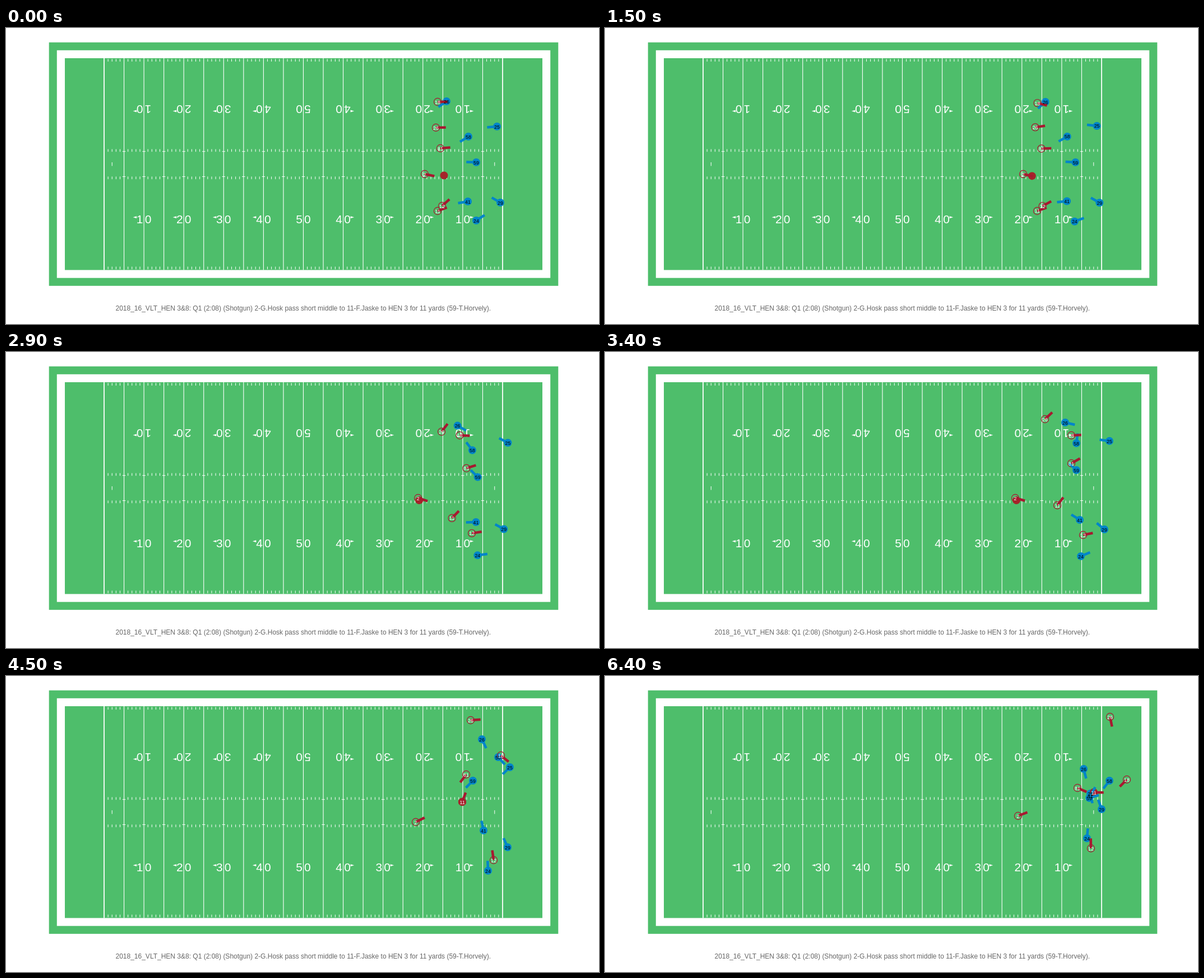
Recreate the animation shown at these times as an HTML page with a canvas. Size 1058 px wide and 529 px high, loop 6500 ms.

```html
<!DOCTYPE html>
<html lang="en">
<head>
<meta charset="utf-8">
<title>Play animation</title>
<style>
  html, body { margin: 0; width: 100%; height: 100%; overflow: hidden; background: #fff; }
  canvas { display: block; }
</style>
</head>
<body>
<canvas id="stage" width="1058" height="529"></canvas>
<script>
const ctx = document.getElementById('stage').getContext('2d');
const GREEN = '#4ebe6b', RED = '#a71930', BLUE = '#0085ca', BALL = '#a5242a';
const LOOP = 6500, STEP = 100;
const GOAL = 175, YARD = 7.11, LEFT = 105, RIGHT = 957, TOP = 54, BOTTOM = 432.5;
const SPOT = [781.5, 263.5], SNAP = [1000, 1850], PASS = [3600, 4300];
const WAYPOINT_TIMES = [1200, 2300, 3400, 4500, 6400];
const players = [];

// Stance is the facing before the pass, in degrees; the route is a few waypoints.
function addPlayer(color, number, stance, route) {
  const player = { color, number, stance: stance * Math.PI / 180, route };
  players.push(player);
  return player;
}
const defense = (number, stance, ...route) => addPlayer(BLUE, number, stance, route);
const offense = (number, stance, ...route) => addPlayer(RED, number, stance, route);

defense(26, 145, [786, 131], [790, 136], [821, 126], [849, 113], [854, 166]);
defense(25, 175, [876, 176], [888, 168], [900, 159], [899, 163], [866, 210]);
defense(58, 148, [825, 194], [826, 189], [841, 163], [878, 145], [900, 187]);
defense(59, 182, [839, 240], [841, 236], [841, 211], [833, 187], [864, 218]);
defense(41, 170, [824, 310], [828, 306], [847, 300], [852, 276], [866, 214]);
defense(29, 210, [882, 312], [885, 314], [891, 317], [895, 306], [886, 238]);
defense(24, -33, [839, 344], [834, 357], [849, 365], [860, 348], [860, 290]);
offense(18, -1, [770, 132], [787, 146], [832, 149], [883, 142], [931, 185]);
offense(26, -1, [767, 178], [773, 166], [785, 120], [829, 79], [901, 73]);
offense(81, -5, [775, 215], [803, 215], [832, 199], [821, 176], [843, 200]);
offense(12, -42, [778, 318], [803, 320], [853, 327], [870, 329], [867, 308]);
const passer = offense(2, 12, [747, 261], [740, 261], [732, 261], [731, 261], [737, 250]);
const receiver = offense(11, -20, [770, 327], [781, 319], [807, 274], [814, 225], [872, 208]);

const clamp = (v, low, high) => Math.max(low, Math.min(high, v));
const progress = (t, [start, end]) => clamp((t - start) / (end - start), 0, 1);
const mix = (a, b, u) => a.map((v, axis) => v + (b[axis] - v) * u);

// Smooth curve through the waypoints, at rest at both ends.
function position({ route }, time) {
  const times = WAYPOINT_TIMES, last = times.length - 1;
  const t = clamp(time, times[0], times[last]);
  let i = 0;
  while (i < last - 1 && t >= times[i + 1]) i++;
  const span = times[i + 1] - times[i], u = (t - times[i]) / span;
  return route[i].map((from, axis) => {
    const slope = k => (route[k + 1][axis] - route[k][axis]) / (times[k + 1] - times[k]);
    const tangent = k => {
      if (k === 0 || k === last) return 0;
      const before = times[k] - times[k - 1], after = times[k + 1] - times[k];
      return (slope(k - 1) * after + slope(k) * before) / (before + after);
    };
    return from + slope(i) * span * u * u * (3 - 2 * u)
      + span * u * (1 - u) * (tangent(i) * (1 - u) - tangent(i + 1) * u);
  });
}

function ballPosition(t) {
  const [x, y] = position(passer, t);
  const held = mix(SPOT, [x + 2, y + 4], progress(t, SNAP));
  return mix(held, position(receiver, t), progress(t, PASS));
}

// Players keep their stance, then watch the ball, and lean into their run.
function facing(player, t, ball) {
  const [x, y] = position(player, t);
  const [dx, dy] = [ball[0] - x, ball[1] - y];
  const distance = Math.max(20, Math.hypot(dx, dy));
  const look = mix([Math.cos(player.stance), Math.sin(player.stance)],
    [dx / distance, dy / distance], progress(t, PASS));
  const earlier = position(player, t - 500), later = position(player, t + 300);
  return Math.atan2(look[1] + (later[1] - earlier[1]) / 20,
    look[0] + (later[0] - earlier[0]) / 20);
}

function line(x1, y1, x2, y2, width, color = '#fff') {
  ctx.strokeStyle = color;
  ctx.lineWidth = width;
  ctx.beginPath();
  ctx.moveTo(x1, y1);
  ctx.lineTo(x2, y2);
  ctx.stroke();
}

function text(string, x, y, size, color) {
  ctx.font = `${size}px "Liberation Sans", Arial, sans-serif`;
  ctx.textAlign = 'center';
  ctx.fillStyle = color;
  ctx.fillText(string, x, y);
}

function circle(x, y, radius) {
  ctx.beginPath();
  ctx.arc(x, y, radius, 0, Math.PI * 2);
}

function disc(x, y, color) {
  circle(x, y, 7);
  ctx.fillStyle = color;
  ctx.fill();
}

function fieldRect(color, margin) {
  ctx.fillStyle = color;
  ctx.fillRect(LEFT - margin, TOP - margin,
    RIGHT - LEFT + 2 * margin, BOTTOM - TOP + 2 * margin);
}

// side: -1 puts the arrow left of the number, 1 right, 0 none.
function yardNumber(x, y, tens, side, flipped) {
  ctx.save();
  ctx.translate(x, y);
  if (flipped) {
    ctx.rotate(Math.PI);
    side = -side;
  }
  text(tens, -7.4, 7.5, 21, '#fff');
  text('0', 7.4, 7.5, 21, '#fff');
  if (side) {
    ctx.beginPath();
    ctx.moveTo(side * 19.5, -3);
    ctx.lineTo(side * 13, -5);
    ctx.lineTo(side * 13, -1);
    ctx.fill();
  }
  ctx.restore();
}

function drawField() {
  ctx.fillStyle = '#fff';
  ctx.fillRect(0, 0, 1058, 529);
  fieldRect(GREEN, 28.3);
  fieldRect('#fff', 14.2);
  fieldRect(GREEN, 0);
  for (let yard = 0; yard <= 100; yard++) {
    const x = GOAL + yard * YARD;
    if (yard % 5 === 0) {
      const isGoal = yard % 100 === 0;
      line(x, TOP, x, BOTTOM, isGoal ? 1.8 : 1.1);
      if (!isGoal) for (const y of [220.7, 265.6]) line(x - 2.7, y, x + 2.7, y, 1);
    } else {
      for (const y of [55.3, 216.5, 265.5, 426.5]) line(x, y, x, y + 4.7, 1);
    }
    if (yard === 2 || yard === 98) line(x, 240, x, 246.5, 1);
  }
  for (let k = 1; k <= 9; k++) {
    const x = GOAL + k * 10 * YARD, tens = 5 - Math.abs(5 - k), side = Math.sign(k - 5);
    yardNumber(x, 341.2, tens, side, false);
    yardNumber(x, 145.5, tens, side, true);
  }
  text('2018_16_VLT_HEN 3&8: Q1 (2:08) (Shotgun) 2-G.Hosk pass short middle to '
    + '11-F.Jaske to HEN 3 for 11 yards (59-T.Horvely).', 530.3, 505, 12, '#666');
}

function draw(t) {
  drawField();
  const ball = ballPosition(t);
  const poses = players.map(player => {
    const [x, y] = position(player, t);
    return { number: player.number, color: player.color, x, y, angle: facing(player, t, ball) };
  });
  for (const { x, y, color } of poses) {
    if (color === BLUE) {
      disc(x, y, BLUE);
    } else {
      circle(x, y, 6.6);
      ctx.strokeStyle = RED;
      ctx.lineWidth = 1.2;
      ctx.stroke();
    }
  }
  disc(...ball, BALL);
  for (const { x, y, angle, color } of poses) {
    line(x, y, x + 17.7 * Math.cos(angle), y + 17.7 * Math.sin(angle), 4.5, color);
  }
  for (const { number, x, y, color } of poses) {
    text(number, x, y + 3.5, 8.8, color === BLUE ? '#000' : '#fff');
  }
}

function tick() {
  draw(Math.floor(performance.now() % LOOP / STEP) * STEP);
  requestAnimationFrame(tick);
}
tick();
</script>
</body>
</html>
```
